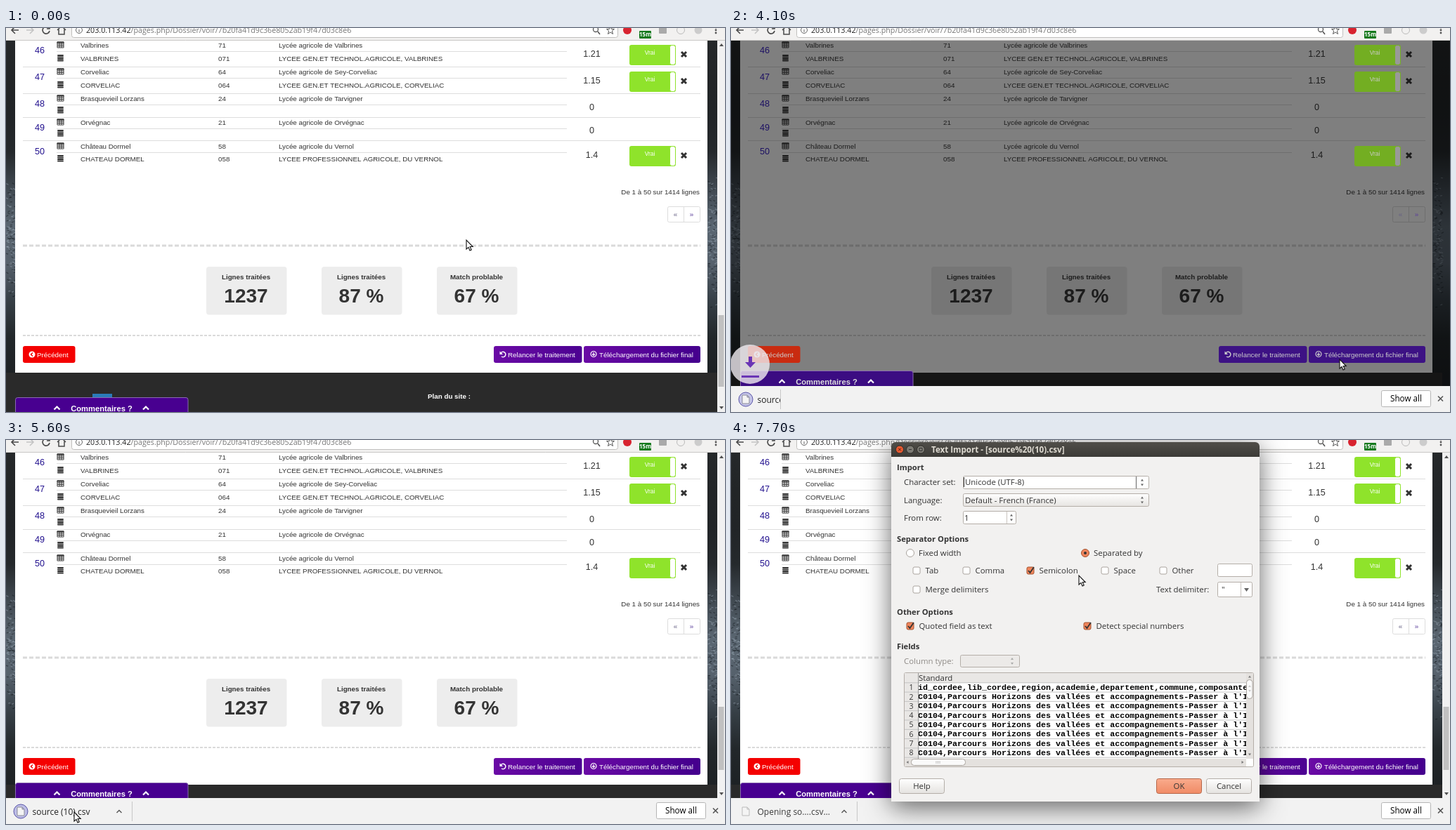
Write an HTML page with a canvas that moves like this. It is 1023 px wide and 547 px high and loops after 8000 ms.

```html
<!DOCTYPE html>
<html lang="fr">
<head>
<meta charset="utf-8">
<style>
html, body { margin: 0; width: 100%; height: 100%; overflow: hidden; background: #fff }
canvas { display: block }
</style>
</head>
<body>
<canvas id="stage" width="1023" height="547"></canvas>
<script>
const ctx = document.getElementById('stage').getContext('2d');
const SANS = '"Liberation Sans", Arial, sans-serif';
const UI = '"Open Sans", "Noto Sans", sans-serif';
const MONO = '"Liberation Mono", monospace';
const LOOP = 8000;

const TICKS = [0, 700, 800, 900, 1000, 1100, 1200, 1300, 1400, 1500, 3700, 3800, 3900, 4100, 4200,
  4400, 4600, 4800, 4900, 5100, 5200, 5400, 5600, 5700, 5900, 6000, 6200, 6300, 6600, 7300, 7700];

// Pointer stops: time, x, y, hand?
const POINTER = [[3700, 866, 472], [4800, 800, 462, 1], [4900, 708, 452, 1], [5100, 430, 359],
  [5200, 126, 391], [5400, 106, 518], [5600, 97, 530], [5700, 90, 541], [7300, 90, 560], [7700, 495, 193]];

const ROWS = [
  [46, 24, 43, 'Valbrines', '71', 'Lycée agricole de Valbrines', '071', 'LYCEE GEN.ET TECHNOL.AGRICOLE, VALBRINES', '1.21'],
  [47, 62, 81, 'Corveliac', '64', 'Lycée agricole de Sey-Corveliac', '064', 'LYCEE GEN.ET TECHNOL.AGRICOLE, CORVELIAC', '1.15'],
  [48, 100, 117, 'Brasquevieil Lorzans', '24', 'Lycée agricole de Tarvigner', '', '', '0'],
  [49, 134, 150, 'Orvégnac', '21', 'Lycée agricole de Orvégnac', '', '', '0'],
  [50, 168, 186, 'Château Dormel', '58', 'Lycée agricole du Vernol', '058', 'LYCEE PROFESSIONNEL AGRICOLE, DU VERNOL', '1.4']];

function text(str, x, y, { size = 9.8, color = '#333', align = 'left', bold, font = SANS } = {}) {
  ctx.font = `${bold ? 'bold ' : ''}${size}px ${font}`;
  ctx.fillStyle = color;
  ctx.textAlign = align;
  ctx.fillText(str, x, y + size * .36);
}

function box(x, y, w, h, fill, radius = 0, stroke) {
  ctx.beginPath();
  ctx.roundRect(x, y, w, h, radius);
  if (fill) { ctx.fillStyle = fill; ctx.fill(); }
  if (stroke) { ctx.strokeStyle = stroke; ctx.lineWidth = 1; ctx.stroke(); }
}

function shape(d, x, y, fill, stroke, width = 1) {
  const path = new Path2D(d);
  ctx.save();
  ctx.translate(x, y);
  ctx.lineWidth = width;
  if (fill) { ctx.fillStyle = fill; ctx.fill(path); }
  if (stroke) { ctx.strokeStyle = stroke; ctx.stroke(path); }
  ctx.restore();
}

function disc(x, y, r, fill, stroke, width = 1) {
  shape(`M${-r} 0A${r} ${r} 0 1 1 ${r} 0A${r} ${r} 0 1 1 ${-r} 0Z`, x, y, fill, stroke, width);
}

function line(x1, y1, x2, y2, color, width = 1, dash = []) {
  ctx.setLineDash(dash);
  shape(`M${x1} ${y1}L${x2} ${y2}`, 0, 0, null, color, width);
  ctx.setLineDash([]);
}

function gradient(x1, y1, x2, y2, ...colors) {
  const g = ctx.createLinearGradient(x1, y1, x2, y2);
  colors.forEach((c, i) => g.addColorStop(i / (colors.length - 1), c));
  return g;
}

function clipped(x, y, w, h, draw) {
  ctx.save();
  ctx.beginPath();
  ctx.rect(x, y, w, h);
  ctx.clip();
  draw();
  ctx.restore();
}

function withShadow(color, blur, dy, draw) {
  ctx.save();
  Object.assign(ctx, { shadowColor: color, shadowBlur: blur, shadowOffsetY: dy });
  draw();
  ctx.restore();
}

function toolbar() {
  box(0, 0, 1023, 18, '#f2f1f0');
  line(0, 17.5, 1023, 17.5, '#c9c8c6');
  box(93.5, -8, 777, 21.5, '#fff', 3, '#c0bfbd');
  shape('M5 0H-5M0 -5L-5 0L0 5', 13, 3, null, '#4a4a4a', 1.6);
  shape('M-5 0H5M0 -5L5 0L0 5', 34, 3, null, '#c4c4c4', 1.6);
  shape('M4 -3A5 5 0 1 0 5 1M5 -6V-2H1', 57, 3, null, '#4a4a4a', 1.6);
  shape('M-6 0L0 -6L6 0M-4 -1V6H4V-1', 79, 3, null, '#4a4a4a', 1.5);
  disc(104, 3, 4.5, null, '#666');
  line(104, 2, 104, 6, '#666');
  const host = '203.0.113.42', url = { size: 10.7, font: UI };
  text(host, 114, 3.5, { ...url, color: '#222' });
  const hostWidth = ctx.measureText(host).width;
  text('/pages.php/Dossier/voir/7b20fa41d9c36e8052ab19f47d03c8e6', 114 + hostWidth, 3.5, { ...url, color: '#777' });
  disc(839, 2, 3.5, null, '#555', 1.3);
  line(842, 5, 845, 9, '#555', 1.6);
  shape('M0 -6L1.5 -1.5H5.5L2.3 1L3.5 5.5L0 3L-3.5 5.5L-2.3 1L-5.5 -1.5H-1.5Z', 860, 3, null, '#555');
  disc(884, 3, 6, '#d8232f');
  box(901, 4, 17, 11, '#14791c', 1);
  text('15m', 909.5, 9.5, { size: 8, color: '#fff', align: 'center', bold: true, font: UI });
  box(929, -2, 11, 10, '#aaa', 1);
  disc(960, 3, 5.5, null, '#bbb');
  disc(985, 3, 5.5, '#ccc');
  [-1, 3, 7].forEach(y => disc(1010, y, 1.4, '#555'));
}

// Dark margins with a rough, lighter band halfway down
function margins() {
  box(0, 18, 1023, 529, gradient(0, 18, 0, 547, '#25282a', '#222527', '#212427', '#25292c', '#414a52', '#5a6671',
    '#56616c', '#363f46', '#22272a', '#1d2124', '#1d2124'));
  let seed = 7;
  const random = () => (seed = seed * 16807 % 2147483647) / 2147483647;
  for (let i = 0; i < 240; i++) {
    const x = random() * 13 + (i % 2) * 998, y = 300 + (random() + random() - 1) * 100;
    line(x, y, x + 3, y + 2 - random() * 4, random() < .5 ? 'rgba(185,200,215,.35)' : 'rgba(15,20,25,.45)', 1.2);
  }
}

function backdrop(bottom, dim) {
  margins();
  box(13, 18, 985, 473, '#fff');
  box(0, 491, 1012, 56, '#2a2a2a');
  box(123, 521, 28, 28, '#2b7bb9');
  for (const [, top] of ROWS) line(72, top + 9.5, 798, top + 9.5, '#ddd');
  [55.5, 93.5, 127.5, 160.5].forEach(y => line(24, y, 988, y, '#ddd'));
  box(941.5, 254.5, 46, 22, '#fff', 2, '#ddd');
  line(964.5, 254, 964.5, 276, '#ddd');
  line(24, 310, 988, 310, '#dadada', 3, [6, 3]);
  line(24, 438, 988, 438, '#dadada', 2, [4, 2]);
  [285, 449, 613].forEach(x => box(x, 340, 114.5, 68.5, '#ededed', 4));
  if (dim) return box(0, 18, 1023, 529, `rgba(0,0,0,${dim})`);
  box(1012, 18, 11, 529, '#f1f1f1');
  shape('M-3 2L0 -2L3 2Z', 1018, 24, '#505050');
  shape('M-3 -2L0 2L3 -2Z', 1018, bottom - 6, '#505050');
  bottom < 547 ? box(1013.5, 380, 8, 90, '#c1c1c1') : box(1013.5, 409, 8, 102, '#c1c1c1');
}

function tableIcon(x, y, color) {
  shape('M-4.5 -4H4.5V4H-4.5ZM-4.5 -1H4.5M-4.5 1.5H4.5M-1.5 -4V4M1.5 -4V4', x, y, null, color);
  box(x - 5, y - 4.5, 10, 2, color);
}

function button(x, w, label, icon, fill, color) {
  box(x, 453, w, 24, fill, 3);
  icon(x + 13);
  text(label, x + (w > 150 ? 22 : 20), 465, { color });
}

function content(dim) {
  const ink = dim ? '#1c1c1c' : '#333', pale = dim ? '#ccc' : '#fff';
  const green = dim ? '#73ae22' : '#8fe32b', red = dim ? '#c92b10' : '#f40000', blue = dim ? '#1d1163' : '#23128f';
  const violet = x => dim ? '#3d1284' : gradient(x, 0, x + 150, 0, '#6a0aa5', '#46008e');
  for (const [id, top, low, town, code, school, code2, school2, score] of ROWS) {
    const mid = (top + low) / 2;
    text(id, 48, top + 7.5, { size: 12.6, color: blue, align: 'center' });
    tableIcon(77.5, top, ink);
    for (let i = 0; i < 4; i++) box(73, low - 5 + i * 2.5, 9, 2, ink, 1);
    text(town, 106, top, { color: ink });
    text(code, 302, top, { color: ink });
    text(school, 388, top, { color: ink });
    text(score, 833.5, score === '0' ? mid + 3.5 : top + 12, { size: 12.6, color: ink, align: 'center' });
    if (!code2) continue;
    text(town.normalize('NFD').replace(/[\u0300-\u036f]/g, '').toUpperCase(), 106, low, { color: ink });
    text(code2, 302, low, { color: ink });
    text(school2, 388, low, { color: ink });
    box(887, top, 66, 29, green, 3);
    box(944.5, top + .5, 8, 28, dim ? '#999' : '#fff', 3, green);
    text('Vrai', 916, top + 10.5, { size: 8.4, color: pale, align: 'center' });
    shape('M-3.5 -3.5L3.5 3.5M3.5 -3.5L-3.5 3.5', 964.5, top + 13.5, null, ink, 3);
  }
  text('De 1 à 50 sur 1414 lignes', 987, 233, { color: ink, align: 'right' });
  text('«', 952.5, 265, { color: '#666083', align: 'center' });
  text('»', 975.5, 265, { color: '#5a3d9a', align: 'center' });
  [['Lignes traitées', '1237'], ['Lignes traitées', '87 %'], ['Match problable', '67 %']].forEach(([label, value], i) => {
    const x = 341.5 + 164 * i;
    text(label, x, 354, { color: ink, align: 'center', bold: true });
    text(value, x, 381, { size: 28, color: ink, align: 'center', bold: true });
  });
  button(24, 74.5, 'Précédent', x => {
    disc(x, 465, 4.5, pale);
    shape('M1 -2.5L-1.5 0L1 2.5', x, 465, null, red, 1.5);
  }, red, pale);
  button(694, 125.5, 'Relancer le traitement', x => {
    shape('M-3 -2A3.7 3.7 0 1 1 -2 3', x, 465, null, pale, 1.5);
    shape('M-4.5 -4.5V0H0Z', x, 465, pale);
  }, violet(694), pale);
  button(822, 166, 'Téléchargement du fichier final', x => {
    disc(x + 1, 464.5, 4, null, pale, 1.2);
    shape('M0 -2.5V2M-2 0L0 2L2 0', x + 1, 464.5, null, pale, 1.2);
  }, violet(822), pale);
  text('Plan du site :', 600, 524, { color: dim ? '#999' : '#fff', bold: true });
}

function comments(y, dim) {
  box(13.5, y - .5, 245.5, 40, dim ? '#3b0c82' : '#480090', 3, '#8a6bb0');
  text('Commentaires ?', 136, y + 14.5, { size: 11.2, color: dim ? '#ddd' : '#fff', align: 'center', bold: true });
  [72.5, 199].forEach(x => shape('M-4 2L0 -2L4 2', x, y + 14.5, null, '#fff', 2.2));
}

function modal(t) {
  box(822.5, 453.5, 165, 23, null, 3, '#8f7fc0');
  withShadow('rgba(0,0,0,.5)', 12, 4, () => box(295, 38, 421, 180, '#fff', 4));
  box(295, 38, 421, 39, '#262626', [4, 4, 0, 0]);
  disc(311, 57.5, 5, '#ddd');
  text('?', 311, 57.5, { size: 8.5, color: '#262626', align: 'center', bold: true });
  text('Téléchargement du fichier', 320, 57.5, { size: 12.6, color: '#ddd' });
  text('×', 701, 57, { color: '#444', align: 'center' });
  const centred = { size: 16.8, align: 'center' };
  text('Votre fichier est en cours de téléchargement', 505.5, 111.5, centred);
  text('Veuillez patienter', 505.5, 129.5, centred);
  text('Cette fenêtre se fermera automatiquement à la fin du téléchargement', 505.5, 194, { ...centred, size: 12.6 });
  const turn = (t - 3700) / 100 * 2;
  for (let i = 0; i < 14; i++) {
    const a = (i + turn + 1) / 14 * 2 * Math.PI;
    disc(505.5 + 14.5 * Math.sin(a), 163 - 14.5 * Math.cos(a), 2.5, `rgba(50,50,50,${1 - i / 14})`);
  }
}

function shelf(t) {
  const opening = t >= 5900, pressed = opening && t < 7700;
  box(0, 510, 1023, 37, '#f2f2f2');
  const edge = t < 4200 ? 70 : t < 4400 ? 115 : t < 4600 ? 165 : 179;
  clipped(0, 510, edge + 1, 37, () => {
    if (pressed) {
      box(2, 511, 177, 36, '#dedede', 2);
      if (t < 6200) disc(90, 548, 40, '#c9c9c9');
    }
    if (!opening) disc(21, 529, 10, `rgba(190,190,230,${.6 + .4 * Math.cos(t / 400 * Math.PI)})`, '#5a55a8');
    shape('M-5 -6H2L5 -3V6H-5ZM2 -6V-3H5', 21, 529, '#f4f4f4', opening ? '#bbb' : '#8d8d9a');
    text(opening ? 'Opening so….csv…' : 'source (10).csv', 37.5, 530, { size: 12, font: UI, color: opening ? '#3c3c3c' : '#222' });
    shape('M-3.5 2L0 -1.5L3.5 2', 161, 529, null, '#555', 1.4);
  });
  line(edge + .5, 515, edge + .5, 543, '#c8c8c8');
  box(925.5, 516.5, 70, 23, '#fff', 2, '#b5b5b5');
  text('Show all', 960.5, 528, { size: 11.7, font: UI, color: '#000', align: 'center' });
  shape('M-3.5 -3.5L3.5 3.5M3.5 -3.5L-3.5 3.5', 1009.5, 528, null, '#555', 1.6);
}

function flyingArrow(t) {
  const p = (t - 4100) / 300;
  ctx.save();
  ctx.globalAlpha = 1 - .6 * p;
  ctx.translate(27, 479 + 32 * p);
  disc(0, 0, 28, 'rgba(240,235,240,.8)');
  shape('M-2 -11H3V-3H8L.5 5L-7 -3H-2ZM-12 16H13V19H-12Z', 0, 0, '#6a35b5');
  ctx.restore();
}

function splash(partial) {
  clipped(200, partial ? 288 : 150, 600, 200, () =>
    withShadow('rgba(0,0,0,.35)', 20, 8, () => box(231, 172, 517, 141, '#fff')));
  ctx.save();
  ctx.clip(new Path2D(partial ? 'M231 222L530 224L410 292L748 288V313H231Z' : 'M231 172H748V313H231Z'));
  box(231, 172, 517, 141, gradient(231, 172, 620, 313, '#6a6a6a', '#5c5c5c', '#686868', '#5a5a5a'));
  shape('M240 313L350 222H400L300 313ZM420 313L330 222H345L450 313Z', 0, 0, 'rgba(0,0,0,.1)');
  box(231, 172, 9, 141, '#2f9a1f');
  shape('M624 313V288L741 172V313Z', 0, 0, '#126200');
  box(741, 172, 7, 141, '#050a05');
  box(261, 226, 53, 53, '#fff');
  text('PaperQuarry', 326, 263, { size: 44, color: '#fff', bold: true, font: UI });
  ctx.restore();
}

function label(str, x, y, extra) {
  text(str, x, y, { size: 11.4, font: UI, color: '#333', ...extra });
}

function steppers(x, y, color = '#666') {
  shape('M-2 -2L0 -5L2 -2ZM-2 2L0 5L2 2Z', x, y, color);
}

function field(x, y, w, h, fill = '#fff') {
  box(x + .5, y + .5, w, h, fill, 2, '#b4aea8');
}

function check(x, y, on) {
  box(x - 5, y - 5, 10, 10, on ? '#f0855c' : '#fff', 2, on ? '#a3532f' : '#aaa49e');
  if (on) shape('M-3 0L-.5 3L5 -5', x, y, null, '#333', 1.8);
}

function dialog() {
  withShadow('rgba(0,0,0,.6)', 36, 8, () => box(228, 3, 524, 512, '#f2f1f0', [6, 6, 0, 0]));
  box(228, 3, 524, 21, gradient(0, 3, 0, 24, '#504e49', '#3c3b37'), [6, 6, 0, 0]);
  disc(240, 13.5, 5.5, '#ea5b32', '#2f2e2a');
  shape('M-2 -2L2 2M2 -2L-2 2', 240, 13.5, null, '#4a2010');
  [255, 270].forEach(x => disc(x, 13.5, 5.5, '#7c7a73', '#2f2e2a'));
  line(253, 13.5, 257, 13.5, '#333');
  box(268, 11.5, 4, 4, null, 0, '#333');
  label('Text Import - [source%20(10).csv]', 285, 14, { size: 11.6, color: '#dfdbd2', bold: true });
  [['Import', 39], ['Separator Options', 140.5], ['Other Options', 244.5], ['Fields', 294]]
    .forEach(([s, y]) => label(s, 236, y, { size: 11.2, bold: true }));

  const soft = gradient(0, 76, 0, 95, '#fff', '#e6e4e1');
  label('Character set:', 246, 60);
  field(330, 51, 264, 18);
  line(576.5, 52, 576.5, 69, '#666');
  line(331.5, 53, 331.5, 67, '#333');
  label('Unicode (UTF-8)', 333, 60);
  label('Language:', 246, 85.5);
  field(330, 76, 264, 18, soft);
  label('Default - French (France)', 333, 85.5);
  label('From row:', 246, 111);
  field(330, 101, 75, 18);
  line(392.5, 102, 392.5, 119, '#c8c3be');
  label('1', 332, 111);
  steppers(585, 60.5);
  steppers(585, 85.5);
  steppers(399, 110.5);

  disc(255, 161, 5.5, '#fff', '#aaa49e');
  label('Fixed width', 267, 161);
  disc(504, 161, 5.5, '#f0855c', '#a3532f');
  disc(504, 161, 2, '#333');
  label('Separated by', 516, 161);
  [['Tab', 264, 186], ['Comma', 335, 186], ['Semicolon', 426, 186, 1], ['Space', 532, 186], ['Other', 615, 186],
    ['Merge delimiters', 264, 213], ['Quoted field as text', 255, 265, 1], ['Detect special numbers', 507, 265, 1]]
    .forEach(([s, x, y, on]) => { check(x, y, on); label(s, x + 12.5, y); });
  field(692, 176, 49, 18);
  label('Text delimiter:', 605, 213);
  field(692, 202, 49, 21);
  line(725.5, 203, 725.5, 223, '#c8c3be');
  label('"', 698, 213);
  shape('M-3.5 -2H3.5L0 3Z', 733.5, 213, '#666');
  label('Column type:', 246, 315, { color: '#8f8b87' });
  field(326, 306, 84, 17, '#eceae8');
  steppers(400, 315, '#aaa');

  field(246, 331, 497, 134);
  box(247, 332, 486, 14, '#e9e7e5');
  box(247, 346, 19, 108, '#e9e7e5');
  label('Standard', 267, 338.5);
  clipped(247, 332, 486, 122, () => {
    for (let i = 0; i < 9; i++) {
      const y = 352 + i * 13.3;
      line(247, y - 6.2, 733, y - 6.2, '#c4c4c4');
      label(i + 1, 256.5, y + .5, { size: 10.5, align: 'center' });
      text(i ? "C0104,Parcours Horizons des vallées et accompagnements-Passer à l'Institut"
        : 'id_cordee,lib_cordee,region,academie,departement,commune,composante', 266, y - .5,
        { size: 11.68, color: '#000', font: MONO, bold: true });
    }
  });
  line(266.5, 332, 266.5, 454, '#999');
  box(733, 332, 10, 122, '#e4e1de');
  box(733.5, 341.5, 8.5, 27, '#fafafa', 4, '#aaa49e');
  steppers(738, 354, '#ccc');
  shape('M-2 1.5L0 -1.5L2 1.5Z', 738, 337, '#777');
  shape('M-2 -1.5L0 1.5L2 -1.5Z', 738, 448, '#777');
  box(247, 454, 486, 11, '#e4e1de');
  box(256.5, 454.5, 77, 9, '#fafafa', 4, '#aaa49e');
  [292, 294.5, 297].forEach(x => line(x, 457, x, 461, '#bbb'));
  shape('M1.5 -2L-1.5 0L1.5 2Z', 251, 459, '#777');
  shape('M-1.5 -2L1.5 0L-1.5 2Z', 728, 459, '#777');

  const plain = gradient(0, 482, 0, 504, '#fff', '#e4e2df');
  [['Help', 239, plain], ['OK', 605, gradient(0, 482, 0, 504, '#f9ab8d', '#f08a65')], ['Cancel', 676, plain]]
    .forEach(([s, x, fill]) => {
      box(x + .5, 482.5, 64, 21, fill, 3, s === 'OK' ? '#b5674a' : '#b4aea8');
      label(s, x + 32.5, 493, { align: 'center' });
    });
}

function pointer(t) {
  let x = 655, y = 302, hand = false;
  if (t >= 3700) [, x, y, hand] = POINTER.findLast(stop => stop[0] <= t);
  else if (t >= 700) {
    const p = Math.min(1, (t - 600) / 900), ease = p * p * (3 - 2 * p);
    x += 212 * ease;
    y += 168 * ease;
    hand = y > 453;
  }
  if (hand) shape('M-2 1Q0 -1 1.5 1V5.5L6.5 7Q7.5 8 7 10L6 14H0L-4.5 8.5Q-4 6.5 -2 8Z', x, y, '#fff', '#111', 1.1);
  else shape('M0 0V13L3 10.3L5 15L7.2 14L5.2 9.5H9.2Z', x, y, '#fff', '#111', 1.1);
}

function draw(t) {
  const hasShelf = t >= 4100, bottom = hasShelf ? 510 : 547;
  const dim = t < 3700 || t >= 4400 ? 0 : t >= 4200 ? .3 : .5;
  toolbar();
  clipped(0, 18, 1023, bottom - 18, () => {
    backdrop(bottom, dim);
    content(dim);
    comments(hasShelf ? 489 : 527, dim);
    if (dim && !hasShelf) modal(t);
  });
  if (hasShelf) shelf(t);
  if (hasShelf && t < 4600) flyingArrow(t);
  if (t >= 6000 && t < 6600) splash(t < 6200);
  if (t >= 6600) dialog();
  pointer(t);
}

function frame() {
  const now = performance.now() % LOOP;
  draw(TICKS.findLast(tick => tick <= now));
  requestAnimationFrame(frame);
}
frame();
</script>
</body>
</html>
```
